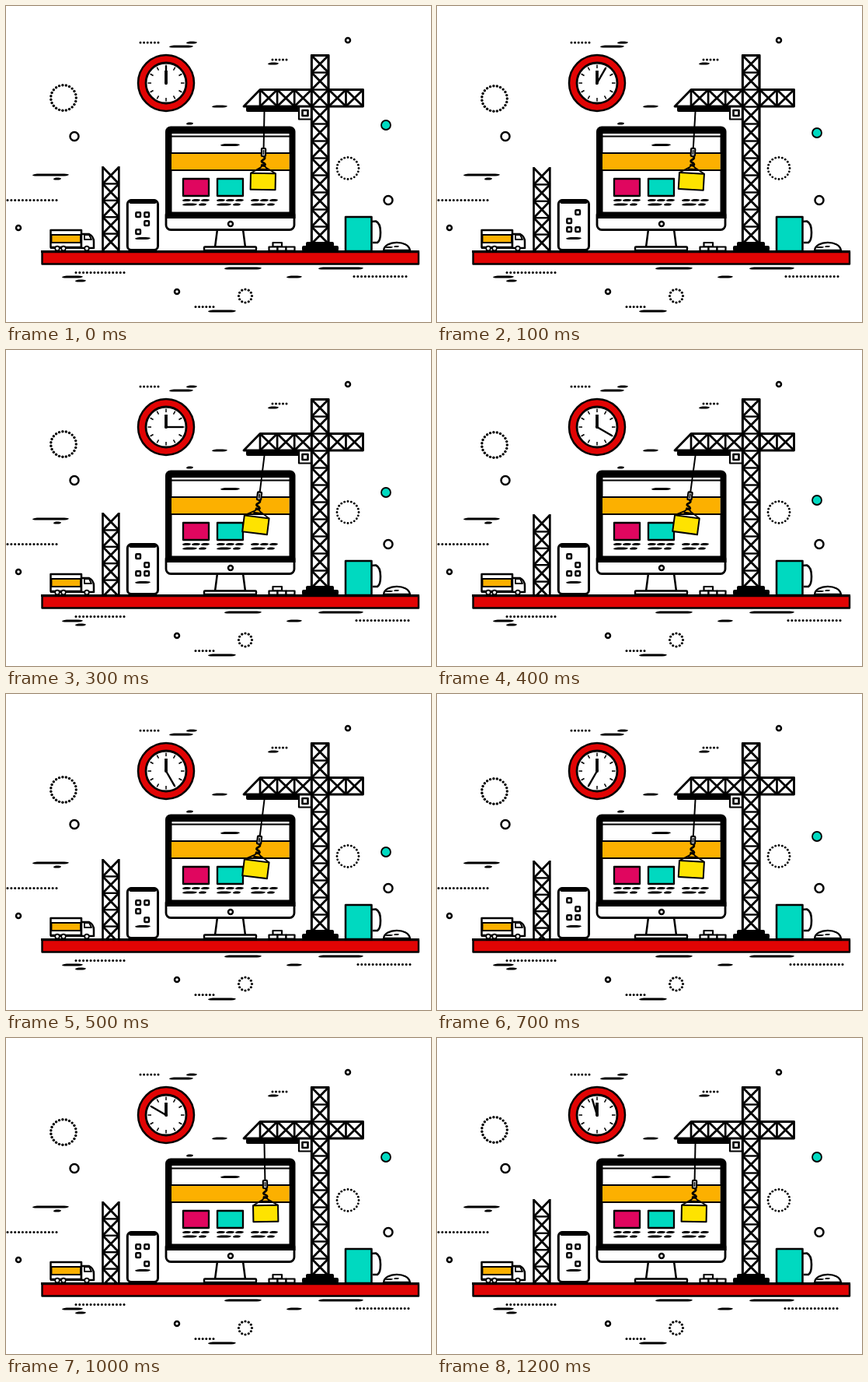
Recreate the animation shown at these times as an HTML page with a canvas. Size 547 px wide and 406 px high, loop 1300 ms.

```html
<!DOCTYPE html>
<html lang="en">
<head>
<meta charset="utf-8">
<title>Desk construction</title>
<style>
html, body { margin: 0; width: 100%; height: 100%; overflow: hidden; background: #fff; }
canvas { display: block; width: 547px; height: 406px; }
</style>
</head>
<body>
<canvas id="stage" width="547" height="406"></canvas>
<script>
const W = 547, H = 406, STEP = 100, STEPS = 13, TURN = 2 * Math.PI;
const INK = '#000', RED = '#e10404', ORANGE = '#fcb000', TEAL = '#00d9c0', PINK = '#e0065f', YELLOW = '#fee300';
const canvas = document.getElementById('stage');
const dpr = window.devicePixelRatio || 1;
canvas.width = W * dpr;
canvas.height = H * dpr;
const c = canvas.getContext('2d');
const rad = deg => deg * Math.PI / 180;

// Motion, all as functions of the step k
const ramp = (k, peak, end) => Math.max(0, Math.min(k / peak, (end - k) / (end - peak)));
const swing = k => 3.3 + 4.4 * Math.sin(TURN * (k - 1) / 12);
const minuteAngle = k => Math.min(30 * k, 343);
const drift = k => Math.round(7 * ramp(k, 7, 12));
const towerDrop = k => Math.round(8 * ramp(k, 7, 13));
const ballY = k => 153 + 50 * ramp(k, 5, 10);
// Icon arrangement 0..3; it slips back once after the fifth step
const iconPhase = k => Math.min(3, Math.round(0.6 * k)) - (k > 5 && k < 9);

function paint(fill, lw = 2.5) {
  if (fill) { c.fillStyle = fill; c.fill(); }
  if (lw) { c.strokeStyle = INK; c.lineWidth = lw; c.stroke(); }
}

function poly(points, fill, lw, closed = true) {
  c.beginPath();
  points.forEach(([x, y]) => c.lineTo(x, y));
  if (closed) c.closePath();
  paint(fill, lw);
}

const line = (x1, y1, x2, y2, lw) => poly([[x1, y1], [x2, y2]], null, lw, false);

function box(x1, y1, x2, y2, fill, lw, r = 0) {
  c.beginPath();
  c.roundRect(x1, y1, x2 - x1, y2 - y1, r);
  paint(fill, lw);
}

function circle(x, y, r, fill = '#fff', lw = 2.5) {
  c.beginPath();
  c.arc(x, y, r, 0, TURN);
  paint(fill, lw);
}

// Brush dash with tapered ends
function dash(x, y, w, h = 3.2) {
  const t = Math.min(6, w / 3), end = x + w;
  c.beginPath();
  c.moveTo(x, y);
  c.quadraticCurveTo(x + t / 2, y - h / 2, x + t, y - h / 2);
  c.lineTo(end - t, y - h / 2);
  c.quadraticCurveTo(end, y - h / 2, end, y);
  c.quadraticCurveTo(end - t / 2, y + h / 2, end - t, y + h / 2);
  c.lineTo(x + t, y + h / 2);
  c.quadraticCurveTo(x, y + h / 2, x, y);
  paint(INK, 0);
}

function dotRow(x, y, w) {
  const n = Math.round(w / 4.8);
  for (let i = 0; i <= n; i++) circle(x + w * i / n, y, 1.5, INK, 0);
}

function dotRing(x, y, r, size) {
  const n = Math.round(TURN * r / 4.5);
  for (let i = 0; i < n; i++) {
    const a = i / n * TURN;
    circle(x + r * Math.cos(a), y + r * Math.sin(a), size, INK, 0);
  }
}

function cross(x, y, w, h) {
  line(x, y, x + w, y + h, 2.8);
  line(x + w, y, x, y + h, 2.8);
}

function sky(d) {
  dotRow(173, 47, 23);
  dash(210, 52, 31);
  dash(232, 47, 14);
  dotRow(343, 69, 18);
  dash(337, 74, 14);
  circle(440, 44, 3);
  dash(265, 129, 20);
  dash(232, 151, 9);
  circle(88, 167.5, 5.5);
  dash(34, 217, 47);
  dash(61, 222, 10);
  dotRow(2, 249.5, 63);
  circle(16, 285, 3);
  circle(492, 249.5, 5.5);
  dotRing(74, 118 + d, 16.3, 1.7);
  dotRing(440, 208.5, 14, 1.4);
}

function underShelf(d) {
  dotRow(90, 342.5, 62);
  dash(72, 348, 27);
  dash(89, 353, 14);
  dash(281, 337, 48);
  dash(361, 348, 20);
  dash(402, 337, 58);
  dotRow(448 + d, 347.5, 67);
  circle(220, 367, 3);
  dotRing(308, 372.5, 8.5, 1.6);
  dotRow(244, 386.5, 23);
  dash(260, 392, 36);
}

function clock(k) {
  circle(206, 99, 36, RED);
  circle(206, 99, 26, '#fff', 2.8);
  c.save();
  c.translate(206, 99);
  for (let i = 0; i < 12; i++) {
    line(0, -23.5, 0, -19, 1.5);
    c.rotate(TURN / 12);
  }
  line(0, 0, 0, -16, 3.8);
  c.rotate(rad(minuteAngle(k)));
  line(0, 2, 0, -22, 2.4);
  c.restore();
  circle(206, 99, 2, INK, 0);
}

// Lattice mast built downwards from its top edge
function mast(x, y, w, cell, n) {
  for (let i = 0; i < n; i++) {
    cross(x, y + i * cell, w, cell);
    if (i) line(x, y + i * cell, x + w, y + i * cell, 2.4);
  }
  line(x, y - 1, x, y + n * cell, 2.7);
  line(x + w, y - 1, x + w, y + n * cell, 2.7);
}

function truck() {
  box(57.5, 288, 97, 310, '#fff', 2.5);
  box(58.5, 294, 96, 304, ORANGE, 1.8);
  c.beginPath();
  c.moveTo(97, 311);
  c.lineTo(97, 293);
  c.lineTo(107, 293);
  c.quadraticCurveTo(113, 296, 113, 303);
  c.lineTo(113, 311);
  c.closePath();
  paint('#fff', 2.5);
  poly([[101, 294], [107, 294], [110, 300], [101, 300]], '#fff', 1.8);
  line(57, 311, 114, 311, 2);
  [66, 74, 104].forEach(x => circle(x, 311.5, 2.8, '#fff', 1.8));
}

// A 2 x 3 icon grid in which each column has one gap
function icons(p) {
  const a = p * TURN / 4;
  const gaps = [1 - Math.round(Math.sin(a)), 1 + Math.round(Math.cos(a))];
  const top = p === 1 || p === 2 ? 265 : 268;
  gaps.forEach((gap, col) => {
    for (let row = 0; row < 3; row++) {
      const x = 170 + col * 11, y = top + row * 11;
      if (row !== gap) box(x - 2.7, y - 2.7, x + 3, y + 3, '#fff', 2.4, 1);
    }
  });
}

function phone(k) {
  box(156.3, 249.5, 195.5, 313.5, '#fff', 3, 5);
  box(158, 248.5, 194, 254, INK, 0, 3);
  icons(iconPhase(k));
  dash(166, 298.5, 20);
}

function card(x, color) {
  if (color) box(x + 1, 222, x + 34, 244, color, 2.3);
  dash(x, 249.5, 11);
  dash(x + 12, 249.5, 11);
  dash(x + 24, 249.5, 11);
  dash(x, 255, 19);
  dash(x + 21, 255, 10);
}

function monitor() {
  poly([[272, 287], [305, 287], [308, 310], [269, 310]], '#fff', 2.5);
  box(255, 309.5, 322, 314, '#fff', 2.4, 1);
  box(206, 262, 371, 287.5, '#fff', 2.8, 6);
  box(205, 154.5, 372.5, 273, INK, 0, [7, 7, 0, 0]);
  box(213.5, 164, 364.5, 264.5, '#fff', 0);
  line(213, 167.5, 365, 167.5, 2);
  box(213, 189, 364.5, 211, ORANGE, 0);
  line(212, 189, 365, 189, 2);
  line(212, 211, 365, 211, 2);
  dash(276, 178.5, 25);
  circle(289, 280, 3, '#fff', 2.4);
  card(227, PINK);
  card(271, TEAL);
  card(315);
}

function crane() {
  const cell = 22.1;
  poly([[306, 129], [327, 107.5], [459.5, 107.5], [459.5, 129]], '#fff', 2.8);
  for (let x = 327; x < 458; x += cell) {
    line(x, 107, x, 130, 2.7);
    cross(x, 107.5, cell, 21.5);
  }
  box(309, 129, 393, 136, INK, 0, 2);
  box(377, 129.5, 393, 145.5, '#fff', 2.2);
  box(381.5, 134, 388.5, 141, '#fff', 2.6);
  box(393.3, 63.5, 415, 315, '#fff', 2.8);
  mast(393.3, 63.5, 21.7, 22, 11);
  line(393, 305.5, 415, 305.5, 2.4);
  box(386, 303, 422, 310, INK, 0, 2);
  box(381, 308, 428, 315, INK, 0, 2);
  for (let x = 388; x < 424; x += 14) dash(x, 311.5, 6, 1.2);
}

function load(k) {
  c.save();
  c.translate(332.5, 136);
  c.rotate(rad(swing(k)));
  line(0, -2, 0, 47, 2);
  box(-2.6, 47, 2.6, 57, '#fff', 2.2, 1);
  line(0, 49, 0, 55, 1.6);
  c.beginPath();
  c.moveTo(0, 57);
  c.bezierCurveTo(6, 61, -6, 62, -1, 65);
  c.bezierCurveTo(5, 67, 2, 71, -3, 68);
  paint(null, 2.8);
  poly([[-16, 79], [-4, 72], [0, 68], [4, 72], [16, 79]], null, 1.8, false);
  line(-5, 74, 5, 74, 2.2);
  box(-16, 79, 16, 100, YELLOW, 2);
  c.restore();
}

function bricks() {
  box(343.5, 304, 355, 309.5, '#fff', 2.2);
  for (let x = 338.5; x < 361; x += 11) box(x, 309.5, x + 11, 314.5, '#fff', 2.2);
}

function mug() {
  c.beginPath();
  c.moveTo(470, 277);
  c.lineTo(476, 276.5);
  c.quadraticCurveTo(482, 279, 482, 291);
  c.quadraticCurveTo(482, 302, 478, 304);
  c.lineTo(472, 304);
  paint('#fff', 2.6);
  box(437, 271, 470.5, 315, TEAL, 2.5);
}

function mouse() {
  c.beginPath();
  c.moveTo(486, 314);
  c.bezierCurveTo(487, 301, 518, 300, 520, 314);
  c.closePath();
  paint('#fff', 2.4);
  dash(488, 310, 10, 2.2);
  dash(499, 309, 7, 2.2);
}

function shelf() {
  box(46.5, 316, 531, 331.5, RED, 2.4);
  line(45, 315.5, 532, 315.5, 3);
}

function draw(k) {
  c.setTransform(dpr, 0, 0, dpr, 0, 0);
  c.fillStyle = '#fff';
  c.fillRect(0, 0, W, H);
  c.lineJoin = 'round';
  sky(drift(k));
  underShelf(drift(k));
  circle(489, ballY(k), 6, TEAL, 1.8);
  clock(k);
  mast(124.5, 207 + towerDrop(k), 20.8, 21.4, 5);
  truck();
  phone(k);
  monitor();
  crane();
  load(k);
  bricks();
  mug();
  mouse();
  shelf();
}

const start = performance.now();
function tick(now) {
  draw(Math.floor(Math.max(0, now - start) / STEP) % STEPS);
  requestAnimationFrame(tick);
}
draw(0);
requestAnimationFrame(tick);
</script>
</body>
</html>
```
